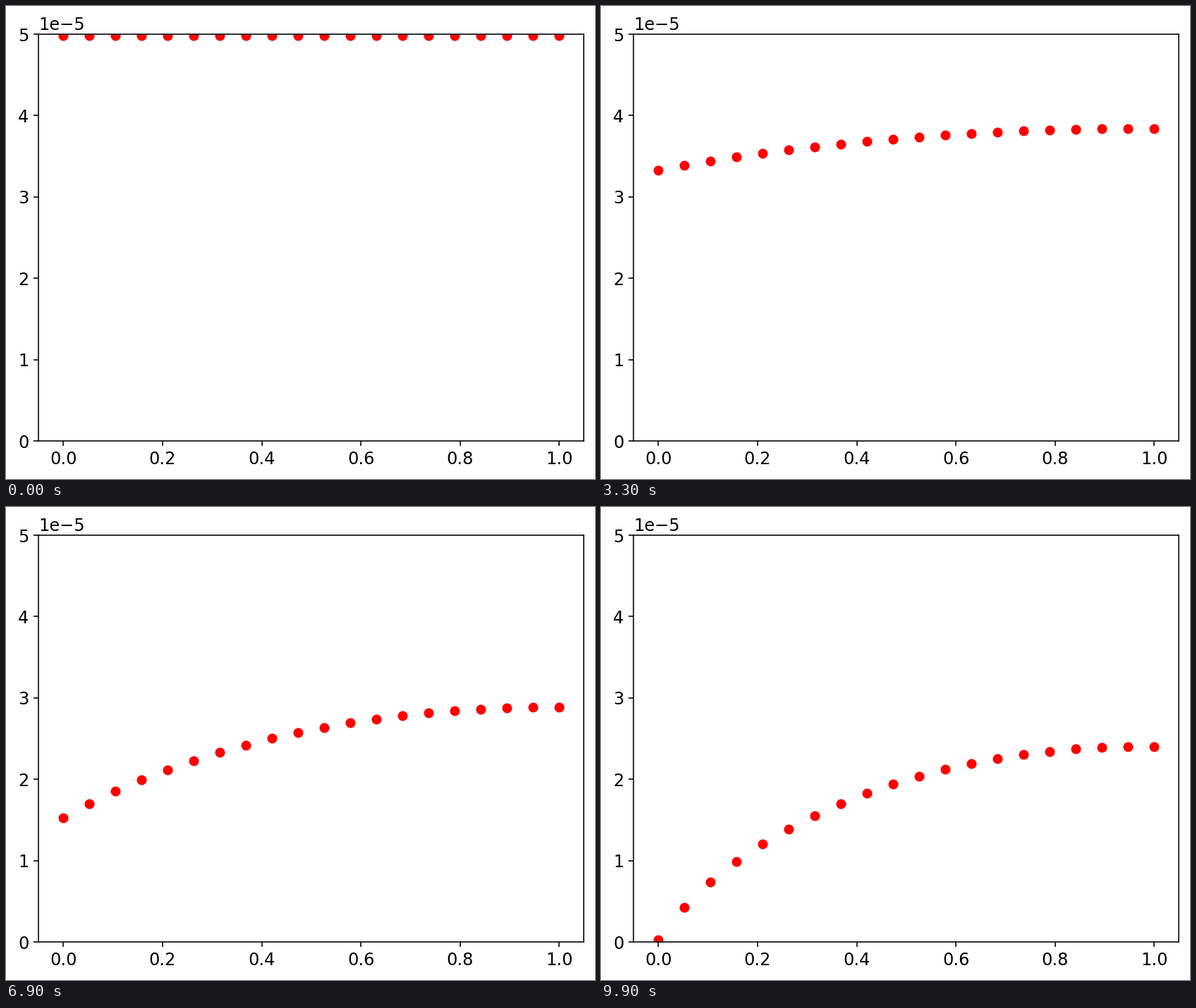
These frames come from a looping animation (835 by 671 pixels, 10 s). A matplotlib script:

```python
import numpy as np
import matplotlib.pyplot as plt
from matplotlib.animation import FuncAnimation

plt.rcParams.update({"font.family": "DejaVu Sans", "font.size": 12})

W, H, DPI = 835, 671, 144
LEFT, RIGHT, TOP, BOTTOM = 46.3, 819.4, 40, 617.1
FRAMES, SUBSTEPS = 100, 5
POINTS = 20
R0 = 5e-5        # starting pore radius
THIELE2 = 0.648  # reaction speed relative to diffusion

x = np.linspace(0, 1, POINTS)


def concentration(r):
    """Steady C'' = THIELE2 * C / r^2 with C(0) = 1 and C'(1) = 0."""
    a = np.zeros((POINTS, POINTS))
    for i in range(1, POINTS - 1):
        a[i, i - 1] = a[i, i + 1] = 1
        a[i, i] = -2 - THIELE2 * (x[1] / r[i]) ** 2
    a[0, 0] = 1
    a[-1, -2:] = -1, 1
    b = np.zeros(POINTS)
    b[0] = 1
    return np.linalg.solve(a, b)


def simulate():
    """Relative radius per frame while the pore wall grows inwards."""
    r = np.ones(POINTS)
    dt = 1 / (FRAMES * SUBSTEPS)
    history = []
    for k in range(FRAMES):
        for _ in range(SUBSTEPS if k else 2):
            r = r - dt * concentration(r)
        history.append(r)
    return history


radii = simulate()

fig = plt.figure(figsize=(W / DPI, H / DPI), dpi=DPI, facecolor="white")
ax = fig.add_axes([LEFT / W, 1 - BOTTOM / H, (RIGHT - LEFT) / W, (BOTTOM - TOP) / H])
ax.set_xlim(-0.05, 1.05)
ax.set_ylim(0, R0)
ax.set_xticks(np.arange(6) / 5)
ax.set_yticks(np.arange(6) * 1e-5)
dots, = ax.plot(x, R0 * radii[0], "o", color="red", markersize=6)


def update(k):
    dots.set_ydata(R0 * radii[k])
    return dots,


anim = FuncAnimation(fig, update, frames=FRAMES, interval=100, repeat=True, repeat_delay=0)
plt.show()
```
